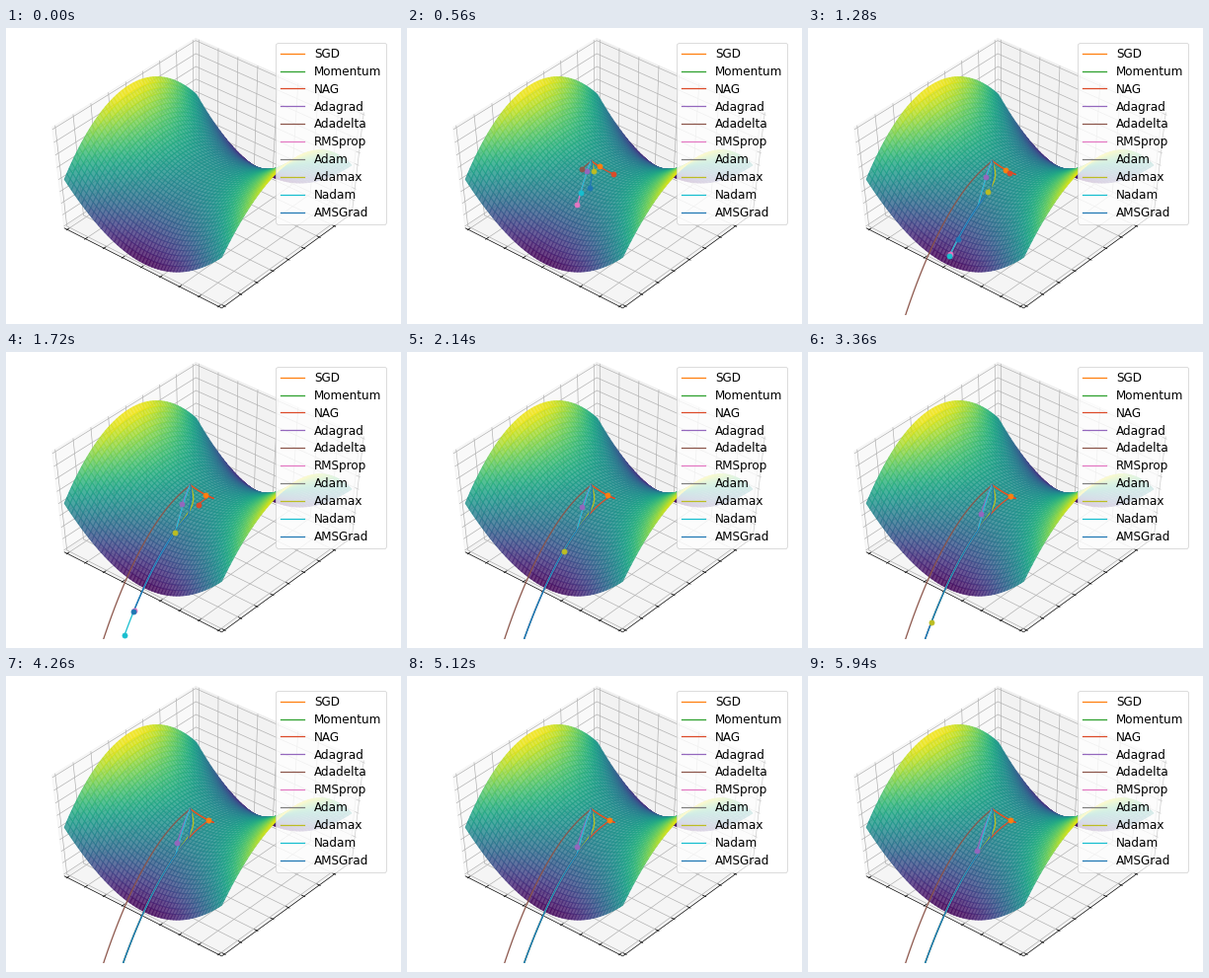
A matplotlib script for the animation above (6.02 s loop, 400x300 px).

```python
import numpy as np
import matplotlib.pyplot as plt
from matplotlib.animation import FuncAnimation
from matplotlib.collections import LineCollection, PolyCollection
from matplotlib.lines import Line2D

W, H, DPI = 400, 300, 60
FRAMES, INTERVAL = 301, 20
PAD = 9
ELEV, AZIM, DIST = np.radians(50), np.radians(-50), 10
EDGE = 25 / 24  # panes sit a little outside the data range

COLORS = {
    "SGD": "#ff7f0e", "Momentum": "#2ca02c", "NAG": "#dc4a28",
    "Adagrad": "#9467bd", "Adadelta": "#8c564b", "RMSprop": "#e377c2",
    "Adam": "#7f7f7f", "Adamax": "#bcbd22", "Nadam": "#17becf",
    "AMSGrad": "#1f77b4",
}

fig = plt.figure(figsize=(W / DPI, H / DPI), dpi=DPI, facecolor="white")
ax = fig.add_axes([PAD / W, PAD / H, 1 - 2 * PAD / W, 1 - 2 * PAD / H])
ax.set(xlim=(PAD, W - PAD), ylim=(H - PAD, PAD))
ax.axis("off")


def project(x, y, z):
    """Map box coordinates (-1..1) to stage pixels and depth."""
    x, y, z = (np.asarray(a, float) / 2 for a in (x, y, z))
    ca, sa, ce, se = np.cos(AZIM), np.sin(AZIM), np.cos(ELEV), np.sin(ELEV)
    depth = DIST - (ce * ca * x + ce * sa * y + se * z)
    u = (-sa * x + ca * y) / depth
    v = (-se * ca * x - se * sa * y + ce * z) / depth
    px = PAD + (W - 2 * PAD) * (u + 0.095) / 0.185
    py = H - PAD - (H - 2 * PAD) * (v + 0.095) / 0.185
    return px, py, depth


def flat(points):
    px, py, _ = project(*np.array(points, float).T)
    return np.column_stack([px, py])


def saddle(x, y):
    return x**2 - y**2


def draw_box():
    e = EDGE
    panes = [
        ([(-e, -e, -e), (-e, e, -e), (-e, e, e), (-e, -e, e)], 0.975),
        ([(-e, e, -e), (e, e, -e), (e, e, e), (-e, e, e)], 0.95),
        ([(-e, -e, -e), (e, -e, -e), (e, e, -e), (-e, e, -e)], 0.9625),
    ]
    for corners, grey in panes:
        ax.fill(*flat(corners).T, fc=str(grey), ec=str(grey - 0.02), lw=1, zorder=0)

    grid, ticks = [], []
    inner, outer = e - 1 / 30, e + 1 / 60
    for t in np.linspace(-1, 1, 9):
        grid += [
            [(t, -e, -e), (t, e, -e), (t, e, e)],
            [(e, t, -e), (-e, t, -e), (-e, t, e)],
            [(-e, -e, t), (-e, e, t), (e, e, t)],
        ]
        ticks += [
            [(t, -inner, -e), (t, -outer, -e)],
            [(inner, t, -e), (outer, t, -e)],
            [(inner, e, t), (outer, e, t)],
        ]
    axes = [
        [(-e, -e, -e), (e, -e, -e)],
        [(e, -e, -e), (e, e, -e)],
        [(e, e, -e), (e, e, e)],
    ]
    for lines, color in ((grid, "#b0b0b0"), (axes + ticks, "black")):
        ax.add_collection(
            LineCollection([flat(p) for p in lines], colors=color, lw=0.8, zorder=1),
            autolim=False,
        )


def draw_surface(n=50):
    x, y = np.meshgrid(np.linspace(-1, 1, n), np.linspace(-1, 1, n))
    z = saddle(x, y)
    px, py, depth = project(x, y, z)

    def quads(a):
        corners = (a[:-1, :-1], a[:-1, 1:], a[1:, 1:], a[1:, :-1])
        return np.stack([c.ravel() for c in corners], axis=1)

    order = np.argsort(-quads(depth).mean(axis=1))
    verts = np.stack([quads(px), quads(py)], axis=2)[order]
    shade = (quads(z).mean(axis=1)[order] + 1) / 2
    colors = plt.cm.viridis(shade, alpha=0.8)
    ax.add_collection(
        PolyCollection(verts, facecolors=colors, edgecolors=colors, lw=1, zorder=2),
        autolim=False,
    )


def trajectories():
    k = np.arange(FRAMES)
    s = k / 28
    x0 = -0.238

    def diagonal(y):
        """Equal-step descent: x closes in on zero as y moves away."""
        return np.minimum(x0 - 0.48 * y, 0), y

    return {
        "SGD": (x0 * np.exp(-0.0205 * k), 0 * k),
        "NAG": (x0 * np.exp(-0.053 * k) * np.cos(np.pi * k / 26),
                -0.0156 * np.exp(np.minimum(0.105 * (k - 64), 5))),
        "Adagrad": (x0 + 0.058 * s**0.53, -0.135 * s**0.53),
        "Adadelta": (x0 * np.exp(-0.0015 * k), -0.153 * s**2.84),
        "RMSprop": diagonal(-0.486 * s**0.78),
        "Adamax": (x0 * np.exp(-(k / 36) ** 2), -0.0079 * k * (1 - np.exp(-k / 60))),
        "Nadam": diagonal(-0.365 * s**1.15),
        "AMSGrad": (x0 * np.clip(1 - k / 30, 0, 1), -0.282 * s**1.27),
    }


draw_box()
draw_surface()

handles = [Line2D([], [], color=c, lw=1.5, label=name) for name, c in COLORS.items()]
ax.legend(handles=handles, loc="upper right", fontsize=14.4,
          labelspacing=0.41).set_zorder(10)

runs = []
for name, (x, y) in trajectories().items():
    y = np.maximum(y, -2.5)
    px, py, _ = project(x, y, saddle(x, y))
    line, = ax.plot([], [], color=COLORS[name], lw=1.5, zorder=4)
    dot, = ax.plot([], [], "o", color=COLORS[name], ms=6, zorder=5)
    runs.append((px, py, line, dot))


def update(k):
    artists = []
    for px, py, line, dot in runs:
        n = k + 1 if k else 0
        line.set_data(px[:n], py[:n])
        dot.set_data(px[k:n], py[k:n])
        artists += [line, dot]
    return artists


anim = FuncAnimation(fig, update, frames=FRAMES, interval=INTERVAL,
                     repeat=True, repeat_delay=0, cache_frame_data=False)
plt.show()
```
